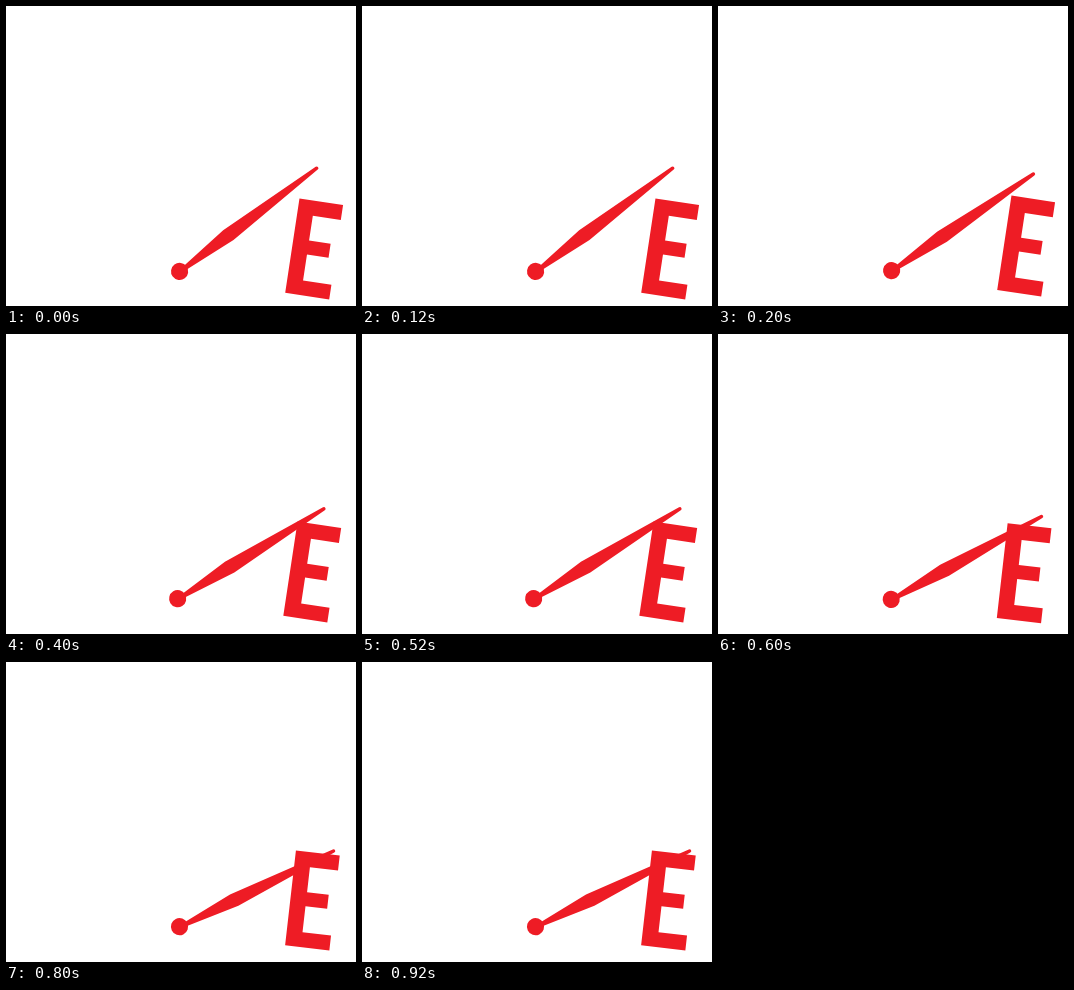
These frames come from a looping animation (350 px wide and 300 px high, 1000 ms). An HTML page:

```html
<!DOCTYPE html>
<html lang="en">
<head>
<meta charset="utf-8">
<title>Gauge on empty</title>
<style>
  html, body { margin: 0; width: 100%; height: 100%; overflow: hidden; background: #fff; }
  svg { display: block; width: 350px; height: 300px; fill: #ee1c25; }
</style>
</head>
<body>
<svg viewBox="0 0 350 300" role="img" aria-label="Gauge needle sinking to E">
  <g id="gauge">
    <g id="needle">
      <circle r="8.6"/>
      <path d="M5 -1.6 L59.5 -6.8 L171.6 -2.2 A1.7 1.7 0 0 1 171.6 1.2 L62 7.1 L5 2.6 Z"/>
    </g>
    <path id="letter" d="M0 0 V-95.4 H44.1 V-80.3 H15.8 V-55.2 H37.6 V-41.2 H15.8 V-14.9 H44.5 V0 Z"/>
  </g>
</svg>
<script>
  const LOOP = 1000, STEPS = 5;
  const [gauge, needle, letter] = ['gauge', 'needle', 'letter'].map(id => document.getElementById(id));

  function place(el, x, y, angle = 0) {
    el.setAttribute('transform', `translate(${x} ${y}) rotate(${angle})`);
  }

  function draw(step) {
    // The whole gauge bobs, and a sideways jolt at step 2 dies away
    const bob = 0.5 * Math.cos(step * Math.PI * 2 / 3);
    const jolt = step < 2 ? 0 : -1.9 * 0.2 ** (step - 2);
    place(gauge, jolt, bob);

    place(needle, 173.6, 264.9, -36.8 + 2.7 * step);

    // The letter rises, then settles at a smaller tilt
    const settled = step > 2;
    place(letter, 279.2, settled ? 283.6 : 286.3 - 2.1 * step, settled ? 6.5 : 8.6);
  }

  function tick() {
    draw(Math.floor(performance.now() % LOOP / LOOP * STEPS));
    requestAnimationFrame(tick);
  }
  tick();
</script>
</body>
</html>
```
